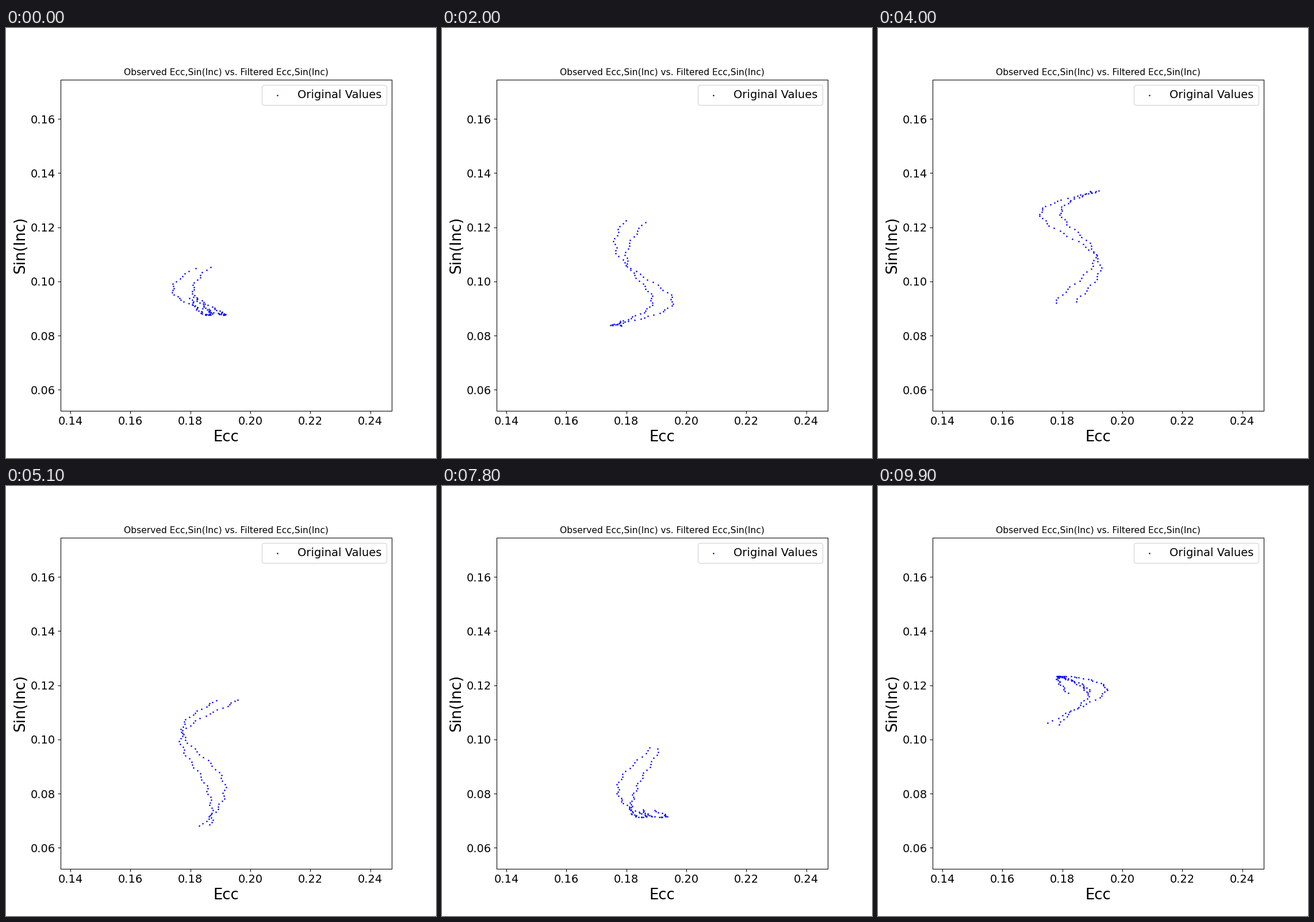
A matplotlib script that plays this animation: 748x748 px, repeating every 10 s.

```python
import numpy as np
import matplotlib.pyplot as plt
from matplotlib.animation import FuncAnimation

FRAMES, INTERVAL = 100, 100
SAMPLES = 100            # time steps shown per frame


def wave(t, period, peak=0):
    """Cosine with the given period and one maximum at peak."""
    return np.cos(2 * np.pi * (t - peak) / period)


def eccentricity(t):
    slow = 0.1842 + 0.0062 * wave(t, 82.5, 1137) + 0.002 * wave(t, 58.8, 6800)
    # A term of nearly two steps splits the path into two beating strands.
    side = np.where(t % 2, -1, 1)
    split = 0.0034 * side * wave(t, 115.6, 5103)
    return slow + split + 0.0005 * wave(t, 8.6)


def inclination(t):
    center = 0.102 + 0.0095 * wave(t, 2100) - 0.005 * wave(t, 1180, 7600)
    return center - 0.0275 * wave(t, 323.7, 60)


def points(frame):
    t = frame * SAMPLES + np.arange(SAMPLES)
    return np.column_stack([eccentricity(t), inclination(t)])


fig, ax = plt.subplots(figsize=(8, 8), dpi=93.5)
ax.set_box_aspect(1)
ax.set_xlim(0.1368, 0.2472)
ax.set_ylim(0.0523, 0.1745)
ax.set_xticks(np.arange(0.14, 0.25, 0.02))
ax.set_yticks(np.arange(0.06, 0.17, 0.02))
ax.xaxis.set_major_formatter("{x:.2f}")
ax.yaxis.set_major_formatter("{x:.2f}")
ax.tick_params(labelsize=15)
ax.set_title("Observed Ecc,Sin(Inc) vs. Filtered Ecc,Sin(Inc)", fontsize=11.9)
ax.set_xlabel("Ecc", fontsize=20)
ax.set_ylabel("Sin(Inc)", fontsize=20)

dots = ax.scatter(*points(0).T, s=1, color="blue", label="Original Values")
ax.legend(loc="upper right", fontsize=15)


def update(frame):
    dots.set_offsets(points(frame))
    return [dots]


anim = FuncAnimation(fig, update, frames=FRAMES, interval=INTERVAL,
                     repeat=True, repeat_delay=0, blit=False)
plt.show()
```
